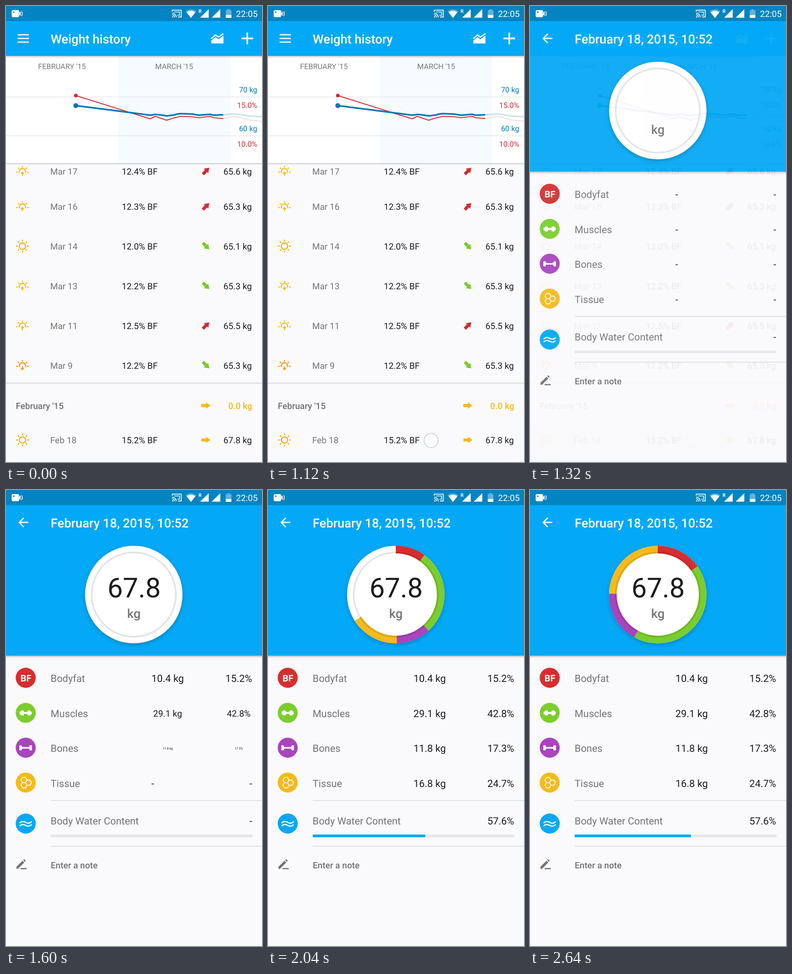
Write an HTML page that moves like this. It is 561 px wide and 998 px high and loops after 3.56 s.

```html
<!DOCTYPE html>
<html lang="en">
<head>
<meta charset="utf-8">
<title>Weight history</title>
<style>
html, body { margin: 0; width: 100%; height: 100%; overflow: hidden; background: #faf9fc; }
svg { display: block; width: 100%; height: 100%; font-family: Roboto, sans-serif; text-rendering: geometricPrecision; }
.m { font-weight: 500; }
.end { text-anchor: end; }
.mid { text-anchor: middle; }
.line { fill: none; stroke-linejoin: round; }
</style>
</head>
<body>
<svg id="stage" viewBox="0 0 561 998">
  <defs>
    <linearGradient id="shade" x1="0" y1="0" x2="0" y2="1">
      <stop offset="0" stop-color="#000" stop-opacity=".26"/>
      <stop offset=".4" stop-color="#000" stop-opacity=".1"/>
      <stop offset="1" stop-color="#000" stop-opacity="0"/>
    </linearGradient>
    <filter id="blur" x="-20%" y="-20%" width="140%" height="140%"><feGaussianBlur stdDeviation="4"/></filter>
    <path id="arrow" d="M-10-3.4H0V-7L10 0 0 7V3.4H-10Z"/>
  </defs>

  <g id="list">
    <rect width="561" height="998" fill="#faf9fc"/>
    <rect id="press" y="911" width="561" height="87" fill="#000" opacity="0"/>
    <g id="rows"></g>
    <rect y="824.5" width="561" height="1.6" fill="#d2d1d4"/>
    <rect y="826" width="561" height="2" fill="#f3f2f5"/>
    <text class="m" x="21.5" y="881.8" font-size="19.1" fill="#6f6f71">February '15</text>
    <use href="#arrow" x="438" y="874.5" fill="#f5b91c"/>
    <text class="m end" x="539.5" y="881.8" font-size="19.1" fill="#f5b91c">0.0 kg</text>

    <rect y="109" width="561" height="235" fill="#fff"/>
    <rect x="246" y="109" width="245" height="235" fill="#f5fbff"/>
    <path d="M0 199H561M0 284H561" stroke="#e6e8ea" stroke-width="1.3"/>
    <g font-size="16.4">
      <text class="mid" x="122.5" y="138" fill="#77777a">FEBRUARY '15</text>
      <text class="mid" x="368.5" y="138" fill="#77777a">MARCH '15</text>
      <g class="end">
        <text x="550.5" y="189" fill="#0277b8">70 kg</text>
        <text x="550.5" y="223" fill="#d22c31">15.0%</text>
        <text x="550.5" y="274" fill="#0277b8">60 kg</text>
        <text x="550.5" y="308" fill="#d22c31">10.0%</text>
      </g>
    </g>
    <g class="line" stroke="#d22c31" stroke-width="2">
      <path d="M153 196L316 247 327 241.5 352 250 368 245 383 241.5 408 242.5 423 244.5 447 241.5 455 244.5 476 246.5"/>
      <path opacity=".18" d="M476 246.5L490 243.5 503 241.5 520 246 537 250 561 252"/>
    </g>
    <g class="line" stroke="#0277b8" stroke-width="3.6">
      <path d="M153 218L278 234 316 239 327 237.3 340 238.5 352 240.5 368 238.5 375 236.5 383 235.5 408 236.5 423 239 447 237 455 239 476 238"/>
      <path opacity=".2" d="M476 238L503 236.3 520 238.8 537 241.2 561 242"/>
    </g>
    <circle cx="153" cy="196" r="4" fill="#d22c31"/>
    <circle cx="153" cy="218" r="5.4" fill="#0277b8"/>
    <rect y="344" width="561" height="4" fill="url(#shade)"/>

    <rect y="33" width="561" height="76" fill="#03a8f6"/>
    <rect y="109" width="561" height="6" fill="url(#shade)"/>
    <g fill="none" stroke="#fff">
      <path d="M25.4 63H50.2M25.4 71H50.2M25.4 79H50.2" stroke-width="2.6"/>
      <path d="M516 71H541.5M528.7 58.2V83.8" stroke-width="3.6"/>
      <path d="M450 71.5L459 63.5 465.5 68 476.5 60.5" stroke-width="2.6"/>
    </g>
    <path d="M450 82V75.5L459 68 465.5 73 476.5 64.5V82Z" fill="#fff"/>
    <text class="m" x="98" y="81.5" font-size="27.3" fill="#fff">Weight history</text>
    <circle id="touch" cx="357.5" cy="951" r="15.4" fill="#fff" fill-opacity=".45" stroke="#cbd3e3" stroke-width="2"/>
  </g>

  <g id="detail" opacity="0">
    <rect width="561" height="998" fill="#faf9fc"/>
    <rect y="33" width="561" height="329.5" fill="#03a8f6"/>
    <rect y="362.5" width="561" height="6" fill="url(#shade)"/>
    <path transform="translate(21.6 54.6) scale(1.365)" fill="#fff" d="M20 11H7.83l5.59-5.59L12 4l-8 8 8 8 1.41-1.41L7.83 13H20z"/>
    <text class="m" x="98" y="81.5" font-size="27.3" fill="#fff">February 18, 2015, 10:52</text>

    <circle cx="280" cy="232" r="107" opacity=".22" filter="url(#blur)"/>
    <circle cx="280" cy="228.8" r="106.8" fill="#fff"/>
    <g id="ring" fill="none" stroke-width="16.8" transform="rotate(-90 280 228.8)"></g>
    <circle cx="280" cy="228.8" r="92.2" fill="none" stroke="#000" stroke-opacity=".11" stroke-width="3.6"/>
    <g id="total" class="mid"><text y="21.4" font-size="60" fill="#1b1b1d">67.8</text></g>
    <text class="m mid" x="280.3" y="280" font-size="27.3" fill="#757577">kg</text>

    <g id="parts" font-size="21.83"></g>
    <path d="M98 679.5H561M98 779.5H561" stroke="#d6d5d8" stroke-width="1.6"/>
    <rect x="98" y="754" width="442" height="6" fill="#e7e6e9"/>
    <rect id="bar" x="98" y="754" height="6" fill="#03a8f6"/>

    <g fill="#fff" stroke="#fff">
      <text class="mid" x="43.7" y="418.6" font-size="20" font-weight="700" stroke="none">BF</text>
      <g stroke="none">
        <rect x="34" y="485.8" width="18" height="4.4"/>
        <rect x="32.4" y="482.4" width="6.8" height="11.2" rx="1.5"/>
        <rect x="47" y="482.4" width="6.8" height="11.2" rx="1.5"/>
        <rect x="29.8" y="484.8" width="4" height="6.4" rx="1"/>
        <rect x="52.2" y="484.8" width="4" height="6.4" rx="1"/>
        <rect x="33" y="562.6" width="20" height="3.4"/>
        <circle cx="31.9" cy="561.6" r="3.1"/><circle cx="31.9" cy="567" r="3.1"/>
        <circle cx="54.1" cy="561.6" r="3.1"/><circle cx="54.1" cy="567" r="3.1"/>
      </g>
      <path id="cells" fill="none" stroke-width="1.7" stroke-linejoin="round"/>
      <path fill="none" stroke-width="2.4" d="M29.8 729C34 724.5 38 724.5 43 727.4S52 730 56.4 725.6M29.8 735.4C34 731 38 731 43 733.9S52 736.4 56.4 732"/>
    </g>
    <g fill="#717173">
      <path d="M23 824.6L36.2 811.4 40 815.2 26.8 828.4 23 829.4ZM37.6 810L39.4 808.6Q40.2 808.2 40.9 808.8L42.8 810.8Q43.3 811.5 42.7 812.3L41.3 813.8Z"/>
      <rect x="32" y="827.4" width="13.4" height="2.6"/>
      <text class="m" x="98" y="828" font-size="19.1">Enter a note</text>
    </g>
  </g>

  <g id="status" fill="#fff">
    <rect width="561" height="33" fill="#0284c1"/>
    <rect x="12.5" y="9" width="16" height="15.4" rx="2.5"/>
    <circle cx="17" cy="13.5" r="1.7" fill="#0284c1"/>
    <path d="M29 14.5L32 11.5V22L29 19Z"/>
    <path d="M34.2 11.5Q36.8 16.7 34.2 22" fill="none" stroke="#fff" stroke-width="1.6"/>
    <g fill="none" stroke="#fff" stroke-width="1.8">
      <path d="M364.3 12.5V9.2H384V24.2H377M364 15.6A9 9 0 0 1 373 24.8M364 19.2A5.4 5.4 0 0 1 369.4 24.8"/>
      <path d="M368.5 13H380.2V20.4H375.4" stroke-width="1.5"/>
    </g>
    <path d="M364 22.3A2.8 2.8 0 0 1 366.8 25H364Z"/>
    <path d="M393.4 11.6Q405.3 2.8 417.2 11.6L405.3 26Z" opacity=".35"/>
    <path d="M395.6 13.8Q405.3 7.4 415 13.8L405.3 26Z"/>
    <path d="M444.2 7V25.5H425.4ZM469.6 7V25.5H450.8Z"/>
    <text x="422" y="15" font-size="10.5" font-weight="700">R</text>
    <path d="M485 7H490.6V9H494V20H481.6V9H485Z" opacity=".38"/>
    <path d="M481.6 19.8H494V24.8Q494 26 492.8 26H482.8Q481.6 26 481.6 24.8Z"/>
    <text x="504" y="23.8" font-size="19.1">22:05</text>
  </g>
</svg>
<script>
const LOOP = 3560;
const $ = id => document.getElementById(id);
const clamp = v => Math.max(0, Math.min(1, v));
const span = (t, start, length) => clamp((t - start) / length);
const easeOut = u => 1 - (1 - u) * (1 - u);

const polar = (x, y, r, deg) => {
  const a = deg * Math.PI / 180;
  return `${(x + r * Math.cos(a)).toFixed(2)} ${(y + r * Math.sin(a)).toFixed(2)}`;
};
const ray = (x, y, deg) => `M${polar(x, y, 10.2, deg)}L${polar(x, y, 14, deg)}`;

function sun(kind, y) {
  const full = kind === 'noon';
  const cy = full ? y - .5 : y + 2.2;
  const color = { rise: '#f5ba1e', noon: '#f5a915', set: '#f5971c' }[kind];
  let d = full ? `M29 ${cy}a7 7 0 1 0 14 0a7 7 0 1 0-14 0` : `M29.4 ${cy + 1.4}A7 7 0 1 1 42.6 ${cy + 1.4}`;
  for (let i = 0; i < (full ? 8 : 5); i++) d += ray(36, cy, 180 + i * 45);
  if (kind === 'rise') d += `M36 ${y + 10}V${y + 4}M32.8 ${y + 5.6}L36 ${y + 2.4}L39.2 ${y + 5.6}`;
  if (kind === 'set') d += `M36 ${y + 2}V${y + 8}M32.8 ${y + 6.2}L36 ${y + 9.4}L39.2 ${y + 6.2}`;
  return `<path d="${d}" fill="none" stroke="${color}" stroke-width="2.3"/>`;
}

const trends = { up: [-45, '#d22c2e'], down: [45, '#79cb2c'], flat: [0, '#f5b91c'] };
const entries = [
  ['rise', 361.5, 'Mar 17', 12.4, 'up', 65.6],
  ['rise', 439, 'Mar 16', 12.3, 'up', 65.3],
  ['noon', 526, 'Mar 14', 12.0, 'down', 65.1],
  ['rise', 613, 'Mar 13', 12.2, 'down', 65.3],
  ['rise', 699.7, 'Mar 11', 12.5, 'up', 65.5],
  ['set', 786.5, 'Mar 9', 12.2, 'down', 65.3],
  ['noon', 950.3, 'Feb 18', 15.2, 'flat', 67.8]
];
$('rows').innerHTML = entries.map(([kind, y, day, fat, trend, kg]) => {
  const [turn, color] = trends[trend];
  return sun(kind, y) + `<g font-size="19.1" fill="#1b1b1d">
    <text x="97" y="${y + 7}" fill="#727274">${day}</text>
    <text x="253.8" y="${y + 7}">${fat.toFixed(1)}% BF</text>
    <text class="end" x="538.8" y="${y + 7}">${kg} kg</text></g>
    <use href="#arrow" transform="translate(438.3 ${y - .5}) rotate(${turn})" fill="${color}"/>`;
}).join('');

// label, icon y, baseline, color, mass, share
const parts = [
  ['Bodyfat', 411, 420, '#d62e2e', '10.4 kg', 15.2],
  ['Muscles', 487.7, 496.6, '#7bcd2d', '29.1 kg', 42.8],
  ['Bones', 564, 573.2, '#a944bd', '11.8 kg', 17.3],
  ['Tissue', 640.3, 649.6, '#f5ba1b', '16.8 kg', 24.7],
  ['Body Water Content', 730, 731.6, '#03a8f6', '', 57.6]
];
const value = (x, y, text) => text &&
  `<g class="mid value" data-x="${x}" data-y="${y}"><text y="7.8">${text}</text></g>`;
$('parts').innerHTML = parts.map(([label, iconY, y, color, mass, share]) => `
  <circle cx="43.2" cy="${iconY}" r="21.9" fill="${color}"/>
  <text x="97.8" y="${y}" fill="#727274">${label}</text>
  <g class="part" fill="#1b1b1d">
    <g class="dash">${mass && `<text x="318.4" y="${y}">-</text>`}<text class="end" x="539.6" y="${y}">-</text></g>
    ${value(354.3, y - 7.8, mass)}${value(510, y - 7.8, share + '%')}
  </g>`).join('');

const slices = parts.slice(0, 4);
$('ring').innerHTML = slices.map(p =>
  `<circle cx="280" cy="228.8" r="98.4" pathLength="100" stroke="${p[3]}"/>`).join('');

const hexagon = (x, y) => 'M' + [0, 60, 120, 180, 240, 300].map(a => polar(x, y, 6.6, a)).join('L') + 'Z';
$('cells').setAttribute('d', hexagon(39.4, 634.8) + hexagon(39.4, 646.2) + hexagon(49.3, 640.5));

const rows = [...document.querySelectorAll('.part')].map(el => ({
  dash: el.querySelector('.dash'),
  values: [...el.querySelectorAll('.value')]
}));
const arcs = [...$('ring').children];

function grow(el, x, y, size) {
  el.setAttribute('transform', `translate(${x} ${y}) scale(${Math.max(size, .001)})`);
  el.setAttribute('visibility', size > 0 ? 'visible' : 'hidden');
}

function draw(t) {
  const fade = span(t, 1190, 139);
  $('detail').setAttribute('opacity', fade);
  $('list').setAttribute('visibility', fade < 1 ? 'visible' : 'hidden');
  $('touch').setAttribute('visibility', t >= 640 && fade < 1 ? 'visible' : 'hidden');
  $('press').setAttribute('opacity', .05 * span(t, 1150, 60));

  const pop = i => easeOut(span(t, 1366 + 100 * i, 200));
  grow($('total'), 280.8, 213.2, pop(0));
  rows.forEach((row, i) => {
    const size = pop(i);
    row.dash.setAttribute('visibility', size > 0 ? 'hidden' : 'visible');
    row.values.forEach(v => grow(v, v.dataset.x, v.dataset.y, size));
  });

  const sweep = easeOut(span(t, 1637, 968));
  let from = 0;
  arcs.forEach((arc, i) => {
    const len = slices[i][5] * sweep;
    arc.setAttribute('stroke-dasharray', `${len} 200`);
    arc.setAttribute('stroke-dashoffset', -from);
    arc.setAttribute('visibility', len > 0 ? 'visible' : 'hidden');
    from += len;
  });
  $('bar').setAttribute('width', 442 * .576 * easeOut(span(t, 1637, 490)));
}

let begin;
function tick(now) {
  begin ??= now;
  draw((now - begin) % LOOP);
  requestAnimationFrame(tick);
}
draw(0);
requestAnimationFrame(tick);
</script>
</body>
</html>
```
